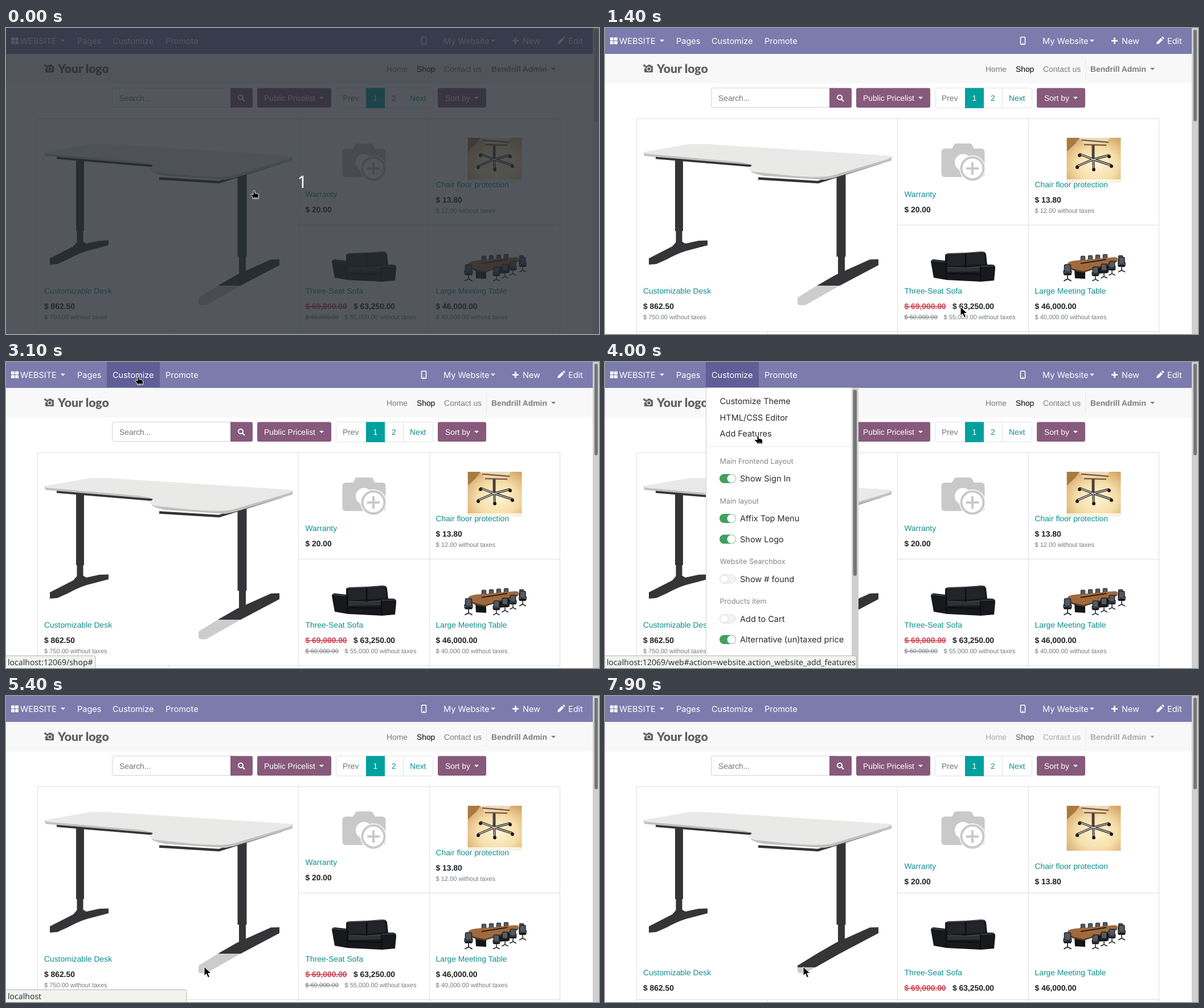
An HTML page for the animation above (8000 ms loop, 1041x538 px).

```html
<!DOCTYPE html>
<html lang="en">
<head>
<meta charset="utf-8">
<title>Shop customization</title>
<style>
  html, body { margin: 0; width: 100%; height: 100%; overflow: hidden; background: #fff; }
  svg { display: block; width: 1041px; height: 538px; font: 13.83px "Liberation Sans", Arial, sans-serif; }
  text { white-space: pre; text-rendering: geometricPrecision; }
  .ui { font-family: Inter, sans-serif; font-size: 14.5px; }
  .bar { fill: #fff; }
  .item { fill: #2b2b2b; }
  .head { fill: #858585; font-size: 12.6px; }
  .link { fill: #0c8f8c; }
  .price { fill: #1d1f21; font-weight: bold; }
  .old { fill: #d23f4d; text-decoration: line-through; }
  .tax { fill: #74797e; font-size: 11.06px; }
  .gone { text-decoration: line-through; }
  .nav { fill: #7b7b7b; }
  .muted { fill: #6c757d; }
  .bold { font-weight: bold; }
  .white { fill: #fff; }
  .logo { font: 900 21.2px Lato, sans-serif; fill: #606060; }
  .status { font: 14px "Noto Sans", sans-serif; fill: #2e3436; }
  .count { font: 300 30px "Noto Sans", sans-serif; fill: #fff; text-anchor: middle; }
</style>
</head>
<body>
<svg id="stage" viewBox="0 0 1041 538" xmlns="http://www.w3.org/2000/svg"></svg>
<script>
const LOOP = 8000;

const text = (x, y, s, cls = '') => `<text x="${x}" y="${y}" class="${cls}">${s}</text>`;
const rect = (x, y, w, h, fill, r = 0, extra = '') =>
  `<rect x="${x}" y="${y}" width="${w}" height="${h}" rx="${r}" fill="${fill}" ${extra}/>`;
const path = (d, fill, extra = '') => `<path d="${d}" fill="${fill}" ${extra}/>`;
const line = (d, color, width = 1, extra = '') =>
  `<path d="${d}" fill="none" stroke="${color}" stroke-width="${width}" ${extra}/>`;
const circle = (x, y, r, fill, extra = '') => `<circle cx="${x}" cy="${y}" r="${r}" fill="${fill}" ${extra}/>`;
const caret = (x, y, fill) => path(`M${x - 4} ${y}h8l-4 4z`, fill);
const group = (id, ...parts) => `<g id="${id}">${parts.join('')}</g>`;

function topBar() {
  const tiles = [0, 7].flatMap(x => [0, 6.5].map(y => rect(9 + x, 16.5 + y, 6, 5.5, '#fff', .8)));
  return [
    rect(0, 0, 1030, 45, '#7c7bad'),
    line('M0 44.900H1030', '#66659c'),
    group('active', rect(177, 0, 93, 45, '#5f5e97')),
    ...tiles,
    ...[[25, 'WEBSITE'], [125, 'Pages'], [187, 'Customize'], [280, 'Promote'],
      [768, 'My Website'], [907, 'New'], [987, 'Edit']].map(([x, s]) => text(x, 27.5, s, 'ui bar')),
    caret(100, 20.5, '#fff'), caret(855, 20.5, '#fff'),
    rect(729.5, 16, 8, 13, 'none', 1.5, 'stroke="#fff" stroke-width="1.6"'),
    line('M732 27h3', '#fff', 1.2),
    line('M889 22.5h11M894.5 17v11', '#fff', 2.6),
    path('M968 28.5l1-4 7-7 3.2 3.2-7 7zM976.8 16.6l1.3-1.2q.8-.6 1.6.1l1.4 1.4q.7.8 0 1.6l-1.2 1.2z', '#fff'),
  ].join('');
}

function header() {
  return [
    rect(0, 45, 1030, 52.5, '#f8f8f8'),
    path('M69 66.5h5l1.5-2h4l1.5 2h2q1 0 1 1v9.5q0 1-1 1h-13q-1 0-1-1v-6h3z', '#606060'),
    circle(77, 72, 3.4, '#606060', 'stroke="#f8f8f8" stroke-width="1.4"'),
    line('M66.5 66h5M69 63.5v5', '#606060', 1.4),
    text(91, 78.5, 'Your logo', 'logo'),
    group('nav',
      text(668, 77, 'Home', 'nav'), text(721, 77, 'Shop'), text(769, 77, 'Contact us', 'nav'),
      line('M843.5 54V90', '#e9e9e9'),
      text(852, 77, 'Bendrill Admin', 'nav bold'), caret(961, 70, '#7b7b7b')),
  ].join('');
}

function toolbar() {
  return [
    rect(186.5, 105.5, 220, 34, '#fff', 3, 'stroke="#ced4da"'),
    text(199, 128, 'Search...', 'muted'),
    path('M394 105.5h36q3 0 3 3v28.5q0 3-3 3h-36z', '#875a7b'),
    circle(412, 122, 4, 'none', 'stroke="#fff" stroke-width="2"'),
    line('M415 125l4 4', '#fff', 2.2),
    rect(441, 105.5, 130, 34.5, '#875a7b', 3),
    text(453, 128, 'Public Pricelist', 'white'), caret(554, 121, '#fff'),
    rect(579.5, 105.5, 170, 35, '#fff', 3, 'stroke="#dee2e6"'),
    rect(632, 105.5, 33, 35.5, '#00a09d'),
    line('M697.5 106V140', '#dee2e6'),
    text(591, 128, 'Prev', 'muted'), text(644.5, 128, '1', 'white'),
    text(677, 128, '2', 'link'), text(709, 128, 'Next', 'link'),
    rect(758, 105.5, 85, 34.5, '#875a7b', 3),
    text(771, 128, 'Sort by', 'white'), caret(826, 121, '#fff'),
  ].join('');
}

function desk() {
  const steel = '#353538';
  return [
    path('M123 231h14v126h-1.500v26h-11v-26H123z', steel),
    path('M77 405L118 384 125 376H136L141 379 164 374 180 373.500V382L142 392Q126 397 108 407L90 415 77 416Z', steel),
    path('M406.500 258h16v144h-1.500v38h-12v-38h-2.500z', steel),
    path('M338 474L372 453 405 434 465 407 480 406.500V417L412 453 352 487Q338 489 338 484Z', steel),
    line('M89 228L262 242.500M269 264.500L374 271 485 236', '#343436', 4.500),
    path('M68 218V222L70 225 262 241 256 252Q262 257 280 260L385 267 400 264 503 233V226L300 230Z', '#bfc0c0'),
    path('M68 218L148 204 180 204 503 225Q504 228 495 231L400 259Q385 264 330 260L262 253Q246 248 256 243 264 239 230 235L70 221Z', '#e9eae8'),
  ].join('');
}

function chair() {
  const legs = 'M857 231L834 222M857 231L829 243M857 231L858 249M857 231L888 241M857 231L884 224';
  return [
    rect(810.5, 193, 95, 79, 'url(#wood)'),
    path('M811 193H833L826 203 811 217Z', '#a87a42'),
    path('M832 193H886L879 205 845 209Z', '#ead9bd'),
    line('M836 197L884 201M841 205L880 206', '#8a5f36', 2.5),
    line('M857 206V232', '#4a413a', 5),
    line(legs, '#2b2624', 4, 'stroke-linecap="round"'),
    line(legs, '#c9c3b8', 1.4),
    ...[[833, 224], [829, 245], [858, 249], [889, 243], [885, 226]].map(([x, y]) => circle(x, y, 3, '#1e1b1a')),
  ].join('');
}

function sofa() {
  return [
    path('M572 411Q573 406 579 407L597 409V399Q598 396 606 396L633 395 660 393Q668 393 669 398L671 416 680 416Q686 417 685 423L683 444 660 446 600 443 577 439Z', '#17181b'),
    path('M600 400L632 398V417L601 419ZM635 398L665 396 668 415 635 417Z', '#222428'),
    path('M601 422L632 423 658 420V428L601 429Z', '#2d3035'),
    line('M598 398L633 396 667 394M574 409L597 411M601 421L632 422 658 420M660 419L682 418', '#565a61', 1.2),
    line('M599 411V441M633 397V422M659 421V444M601 432L658 433', '#08090a', 1.4),
  ].join('');
}

function meeting() {
  const seat = (x, y, s) => `<g transform="translate(${x} ${y}) scale(${s})">` +
    rect(-5, 0, 10, 12, '#555a61', 2, 'stroke="#23262b" stroke-width="1.5"') + rect(-6, 13, 12, 4, '#17191c', 1) +
    line('M0 17v7M-6 26l6-3 6 3M-6 9v6M6 9v6', '#1f2226', 1.6) + '</g>';
  return [
    ...[[839, 401], [852, 400], [865, 399], [878, 398], [905, 400]].map(([x, y]) => seat(x, y, .72)),
    path('M824 424L843 428V441L825 440ZM866 421L884 415V430L866 432Z', '#141517'),
    path('M812 414Q813 409 838 408L893 403Q903 403 899 408L866 419 840 427Q812 423 812 414Z', '#a06a3c'),
    path('M812 415Q814 423 840 427L866 419 899 408V411L866 422 840 430Q812 426 812 418Z', '#5c3a20'),
    line('M835 414L880 407', '#2b211b', 2.2),
    ...[[812, 416, 1.1], [861, 420, .95], [876, 415, .95], [890, 410, .95], [907, 403, 1]].map(s => seat(...s)),
  ].join('');
}

function placeholder() {
  const gray = '#c9c9c9';
  return [
    path('M597 212H609L613 205Q614 203 617 203H640Q643 203 644 205L648 212H660Q666.5 212 666.5 218V256Q666.5 262 660 262H597Q590.5 262 590.5 256V218Q590.5 212 597 212Z', gray),
    circle(628.5, 236, 14.5, '#fff'),
    circle(645, 247, 23, '#fff'), circle(645, 247, 19.5, '#fff', `stroke="${gray}" stroke-width="4"`),
    line('M634 247h22M645 236v22', gray, 4),
  ].join('');
}

const products = [
  { x: 67, bottom: 533, left: 56, width: 457, name: 'Customizable Desk', price: '$ 862.50', net: '$ 750.00' },
  { x: 525.5, bottom: 346, left: 514, width: 229, name: 'Warranty', price: '$ 20.00' },
  { x: 754.5, bottom: 346, left: 744, width: 228, name: 'Chair floor protection', price: '$ 13.80', net: '$ 12.00' },
  { x: 525.5, bottom: 533, left: 514, width: 229, name: 'Three-Seat Sofa', price: '$ 63,250.00', net: '$ 55,000.00',
    oldPrice: '$ 69,000.00', oldNet: '$ 60,000.00' },
  { x: 754.5, bottom: 533, left: 744, width: 228, name: 'Large Meeting Table', price: '$ 46,000.00', net: '$ 40,000.00' },
];

function labels(withNet) {
  return products.map(p => {
    const rise = !withNet ? 42 : p.net ? 66 : 49;
    const y = p.bottom - rise;
    return [
      rect(p.left, y - 14, p.width, p.bottom - y + 14, '#fff', 0, 'opacity=".75"'),
      text(p.x, y, p.name, 'link'),
      p.oldPrice ? text(p.x, y + 27, p.oldPrice, 'price old') : '',
      text(p.oldPrice ? 610 : p.x, y + 27, p.price, 'price'),
      withNet && p.oldNet ? text(p.x, y + 44.5, p.oldNet, 'tax gone') : '',
      withNet && p.net ? text(p.oldNet ? 594.5 : p.x, y + 44.5, p.net + ' without taxes', 'tax') : '',
    ].join('');
  }).join('');
}

function grid() {
  return line('M55.5 538V159.5H972.5V538M513.5 159V538M743.5 159V538M285.5 533V538M514 346.5H972M55 533.5H972', '#dcdee0');
}

const links = [[74, 'Customize Theme'], [102.5, 'HTML/CSS Editor'], [131, 'Add Features']]
  .map(([y, s]) => text(201.5, y, s, 'ui item')).join('');

function toggle(y, on, label) {
  const pill = on
    ? rect(201, y - 8, 29, 16, '#40a060', 8) + circle(222, y, 7.3, '#fff', 'stroke="#d5dfd8" stroke-width=".6"')
    : rect(201.5, y - 7.5, 28, 15, '#f3f3f3', 7.5, 'stroke="#e0e0e0"') + circle(209, y, 7.3, '#fff', 'stroke="#d0d0d0" stroke-width=".8"');
  return pill + text(237, y + 5, label, 'ui item');
}

function fullMenu() {
  return [
    rect(177, 45, 268, 493, '#fff'),
    line('M177.5 45V538', '#cfcfcf'),
    links,
    line('M178 148.5H433', '#e4e6e8'),
    ...[[174, 'Main Frontend Layout'], [244, 'Main layout'], [350.5, 'Website Searchbox'], [420.5, 'Products item']]
      .map(([y, s]) => text(201.5, y + 4.5, s, 'ui head')),
    ...[[205, 1, 'Show Sign In'], [275, 1, 'Affix Top Menu'], [311.5, 1, 'Show Logo'],
      [381.5, 0, 'Show # found'], [451.5, 0, 'Add to Cart'], [488, 1, 'Alternative (un)taxed price']]
      .map(row => toggle(...row)),
    rect(433, 45, 12, 493, '#cfcfcf'), rect(435.5, 49, 6.5, 327, '#767676', 3.2),
  ].join('');
}

document.getElementById('stage').innerHTML = [
  `<defs><radialGradient id="wood" cx=".55" cy=".6" r=".75"><stop stop-color="#fff4d2"/>
   <stop offset=".5" stop-color="#f6deaa"/><stop offset="1" stop-color="#cf9f5c"/></radialGradient></defs>`,
  rect(0, 0, 1041, 538, '#fff'),
  header(), topBar(), toolbar(),
  placeholder(),
  group('photos', desk(), chair(), sofa(), meeting()),
  group('net', labels(true)), group('gross', labels(false)),
  grid(),
  group('shortMenu', rect(177.5, 45, 174, 120.5, '#fff', 0, 'stroke="#cfcfcf"'), links),
  group('fullMenu', fullMenu()),
  '<rect id="track" x="1030" width="11" height="538"/><rect id="thumb" x="1033" y="3" width="6" height="161" rx="3"/>',
  group('status', '<path id="bubble" fill="#f2f2ef" stroke="#b4b4b0"/>', text(3, 532.5, '', 'status')),
  group('veil', rect(0, 0, 1041, 538, 'rgb(38,42,50)', 0, 'opacity=".79"'), text(520, 281, '1', 'count')),
  group('hand', path('M5 1.500Q6.500 0 8 1.500V5.500L12 6Q14.500 6.500 14.500 9V15H4.500V12.500L1 9.500Q0 7.500 2 7L5 8Z', '#000', 'stroke="#fff"'),
    line('M6 13.500H13', '#fff', .8)),
  group('arrow', path('M0 0V16L3.700 12.500 6.500 19 9.500 17.700 6.700 11.500H12Z', '#000', 'stroke="#fff"')),
].join('');

const el = Object.fromEntries([...document.querySelectorAll('[id]')].map(e => [e.id, e]));
const statusText = el.status.querySelector('text');

// Visible time spans in ms
const spans = {
  veil: [[0, 100]],
  active: [[3000, 5000]],
  shortMenu: [[3300, 3600]],
  fullMenu: [[3600, 5000]],
  net: [[0, 7400]],
  gross: [[7400, LOOP]],
  photos: [[0, 7400], [7600, LOOP]],
};

// Start time, text, bubble width
const statusSteps = [
  [0, '', 0], [2700, 'localhost:12069/shop#', 157],
  [3900, 'localhost:12069/web#action=website.action_website_add_features', 441],
  [4200, 'localhost:12069/shop#', 157], [5000, 'localhost', 317],
  [7400, 'Esperando a localhost…', 317], [7700, '', 0],
];

// Start time, shape, x, y
const cursorSteps = [
  [0, 'hand', 429, 285], [100, 'hand', 482, 360], [200, 'hand', 541, 414], [300, 'hand', 588, 455],
  [400, 'arrow', 617, 482], [700, 'arrow', 622, 488], [800, 'arrow', 627, 492],
  [1400, 'arrow', 624, 490], [1500, 'arrow', 618, 487], [1600, 'arrow', 612, 483], [1700, 'arrow', 606, 480],
  [2000, 'arrow', 578, 449], [2100, 'hand', 445, 325], [2200, 'hand', 250, 178], [2300, 'arrow', 66, 50],
  [2400, '', 0, 0], [2600, 'arrow', 22, 60], [2700, 'hand', 92, 33], [2800, 'hand', 145, 24],
  [2900, 'hand', 184, 22], [3000, 'hand', 212, 23], [3100, 'hand', 226, 25],
  [3700, 'hand', 232, 30], [3900, 'hand', 256, 98], [4000, 'hand', 262, 129],
  [4200, 'hand', 266, 142], [4400, 'hand', 274, 162], [4600, 'hand', 284, 184], [4700, 'hand', 290, 200],
  [4800, 'hand', 330, 491], [5300, 'arrow', 342, 481], [5400, 'arrow', 348, 476],
];

const at = (steps, t) => steps.findLast(step => step[0] <= t);
const show = (e, on) => { e.style.display = on ? '' : 'none'; };

function draw(t) {
  for (const id in spans) show(el[id], spans[id].some(([a, b]) => t >= a && t < b));

  const [, label, width] = at(statusSteps, t);
  show(el.status, label);
  statusText.textContent = label;
  el.bubble.setAttribute('d', `M-1 516.5H${width - 3}q3 0 3 3V540H-1Z`);

  const [, shape, x, y] = at(cursorSteps, t);
  for (const id of ['hand', 'arrow']) {
    show(el[id], id === shape);
    el[id].setAttribute('transform', `translate(${x} ${y})`);
  }

  const focused = t >= 700;
  el.track.setAttribute('fill', focused ? '#cfcfcf' : '#eeeeee');
  el.thumb.setAttribute('fill', focused ? '#767676' : '#c4c4c4');
  el.nav.style.opacity = t < 7400 ? 1 : t < 7600 ? 0 : (Math.floor((t - 7600) / 100) + 1) * .16;
}

const start = performance.now();
function tick() {
  draw((performance.now() - start) % LOOP);
  requestAnimationFrame(tick);
}
tick();
</script>
</body>
</html>
```
